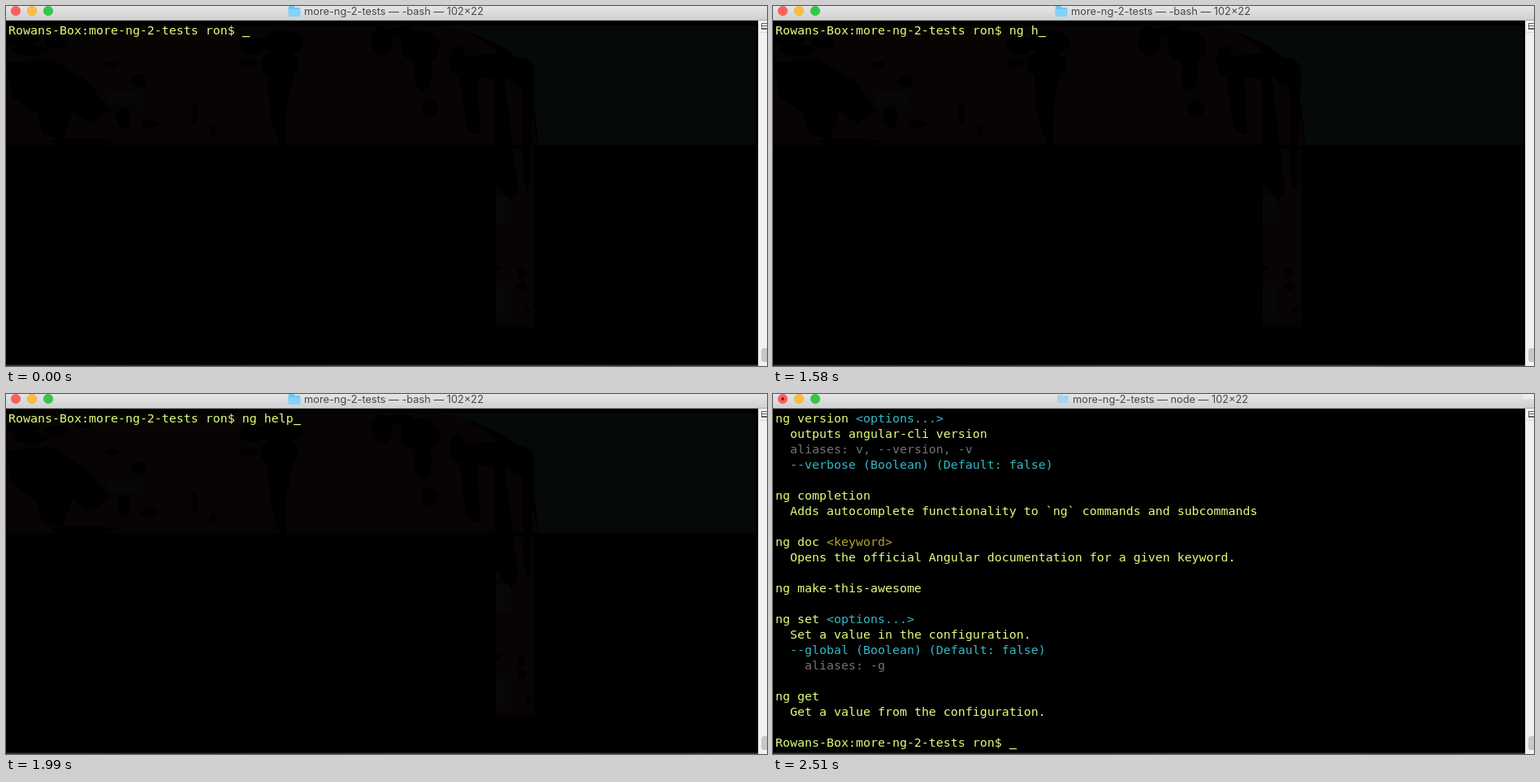
Recreate the animation shown at these times as an HTML page. Size 937x443 px, loop 2.63 s.

```html
<!DOCTYPE html>
<html lang="en">
<head>
<meta charset="utf-8">
<title>Terminal</title>
<style>
  html, body { margin: 0; width: 100%; height: 100%; overflow: hidden; background: #000; }
  svg { display: block; width: 937px; height: 443px; }
  text { white-space: pre; }
  .mono { font: 14.95px "DejaVu Sans Mono", monospace; }
  .title { font: 12.8px Inter, sans-serif; fill: #484848; }
</style>
</head>
<body>
<svg id="stage" viewBox="0 0 937 443">
  <defs>
    <linearGradient id="bar" x2="0" y2="1">
      <stop stop-color="#e5e5e5"/><stop offset="1" stop-color="#d1d1d1"/>
    </linearGradient>
    <linearGradient id="desk">
      <stop stop-color="#30383a"/><stop offset=".2" stop-color="#202a35"/>
      <stop offset=".45" stop-color="#263840"/><stop offset=".62" stop-color="#4a3024"/>
      <stop offset=".74" stop-color="#59301f"/><stop offset=".82" stop-color="#25333a"/>
      <stop offset="1" stop-color="#34393c"/>
    </linearGradient>
  </defs>
  <rect width="937" height="443"/>
  <g id="shade">
    <path fill="#080404" d="M0 24H530Q635 35 655 171H0ZM603 176H650V395H603Z"/>
    <path fill="#060909" d="M530 24H924V171H655Q650 60 600 45Q565 27 530 24Z"/>
    <g id="blobs"></g>
    <path d="M601 90Q606 78 614 90L629 215Q632 238 618 238L603 215ZM636 85Q648 72 650 92L644 225Q639 232 637 195ZM558 85L580 88L584 158Q568 158 566 143ZM322 80L354 85L345 125L344 192L325 135ZM0 70L55 65L100 92L128 128L104 145L82 130L70 164L45 158L38 132L8 112Z"/>
    <path fill="#060808" d="M125 107H167V121H125ZM603 234H618Q623 237 622 268H603ZM603 345H621V384H603Z"/>
  </g>
  <rect width="937" height="17" fill="url(#bar)"/>
  <path fill="#a9a9a9" d="M0 17H937V18H0Z"/>
  <circle cx="12" cy="6" r="5.75" fill="#fc605c" stroke="#e14942" stroke-width=".5"/>
  <circle cx="32" cy="6" r="5.75" fill="#fdbc40" stroke="#dfa023" stroke-width=".5"/>
  <circle cx="52" cy="6" r="5.75" fill="#34c84a" stroke="#25aa35" stroke-width=".5"/>
  <path fill="#f1f1f1" d="M926 18H937V443H926Z"/>
  <path fill="#d9d9d9" d="M926 18H927V443H926ZM926 32H937V33H926Z"/>
  <path fill="#606060" d="M930 21H937V22H930ZM930 24H937V25H930ZM930 27H937V29H930ZM930 21H931V29H930Z"/>
  <rect x="930" y="421" width="10" height="17" rx="3.5" fill="#c7c7c7"/>
  <rect y="441.5" width="926" height="1.5" fill="url(#desk)"/>
  <g id="shell">
    <path fill="#6ac4f4" d="M348 0H354L356 2H362V12H348Z"/>
    <path fill="#83d2fb" d="M347 4H363L362 13H348Z"/>
    <text class="title" x="367" y="11">more-ng-2-tests — -bash — 102×22</text>
  </g>
  <g id="help">
    <circle cx="12" cy="6" r="2" fill="#8c1a15"/>
    <path fill="#a7d5ec" d="M350 1H356L357 2H364V11H350Z"/>
    <text class="title" x="369" y="11">more-ng-2-tests — node — 102×22</text>
    <path fill="#ededed" d="M924 0H937V6H924Z"/>
  </g>
  <path id="marks" fill="none" stroke="#777" d="M2 25.5H.5V35.5H2M922 25.5H923.5V35.5H922"/>
</svg>
<script>
const LOOP = 2630, ENTER = 2450, OUTPUT = 2510;
const CELL = 9, LINE = 19, LEFT = 3, BASE = 35;
const LIME = '#deff7c', CYAN = '#33b9c7', GRAY = '#737373', OLIVE = '#b3a32d';
const PROMPT = 'Rowans-Box:more-ng-2-tests ron$ ';
const $ = id => document.getElementById(id);

function add(parent, tag, attrs) {
  const el = document.createElementNS('http://www.w3.org/2000/svg', tag);
  for (const key in attrs) el.setAttribute(key, attrs[key]);
  return parent.appendChild(el);
}

function write(parent, row, col, str, fill = LIME) {
  const el = add(parent, 'text', { class: 'mono', x: LEFT + col * CELL, y: BASE + row * LINE, fill });
  el.textContent = str;
  return el;
}

// Dark patches in the translucent background: x, y, rx, ry
const blobs = [
  [20, 42, 20, 6], [62, 45, 14, 7], [30, 54, 22, 7], [95, 37, 10, 5],
  [164, 92, 9, 8], [145, 137, 9, 13], [177, 146, 11, 5], [130, 72, 9, 4],
  [232, 133, 4, 13], [255, 153, 3, 6], [303, 49, 16, 11], [340, 45, 26, 15],
  [298, 71, 11, 5], [337, 72, 24, 17], [463, 43, 13, 18], [487, 32, 15, 7],
  [510, 50, 24, 20], [513, 82, 11, 23], [521, 126, 10, 11], [556, 67, 10, 18],
  [598, 74, 47, 15], [634, 82, 16, 18], [634, 328, 5, 8], [635, 345, 6, 5],
  [606, 323, 4, 3], [643, 375, 3, 3], [95, 167, 40, 4]
];
for (const [cx, cy, rx, ry] of blobs) add($('blobs'), 'ellipse', { cx, cy, rx, ry });

const typed = write($('shell'), 0, 0, PROMPT);
const cursor = add($('stage'), 'rect', { width: CELL, height: 1.2, fill: LIME });

const help = [
  [0, 0, 'ng version'], [0, 11, '<options...>', CYAN],
  [1, 2, 'outputs angular-cli version'],
  [2, 2, 'aliases: v, --version, -v', GRAY],
  [3, 2, '--verbose (Boolean) (Default: false)', CYAN],
  [5, 0, 'ng completion'],
  [6, 2, 'Adds autocomplete functionality to `ng` commands and subcommands'],
  [8, 0, 'ng doc'], [8, 7, '<keyword>', OLIVE],
  [9, 2, 'Opens the official Angular documentation for a given keyword.'],
  [11, 0, 'ng make-this-awesome'],
  [13, 0, 'ng set'], [13, 7, '<options...>', CYAN],
  [14, 2, 'Set a value in the configuration.'],
  [15, 2, '--global (Boolean) (Default: false)', CYAN],
  [16, 4, 'aliases: -g', GRAY],
  [18, 0, 'ng get'],
  [19, 2, 'Get a value from the configuration.'],
  [21, 0, PROMPT]
];
for (const line of help) write($('help'), ...line);

const COMMAND = 'ng help';
const keyTimes = [1140, 1230, 1350, 1580, 1700, 1870, 1990];

function show(el, on) {
  el.style.display = on ? '' : 'none';
}

function render(t) {
  const done = t >= OUTPUT, entered = t >= ENTER;
  const count = keyTimes.filter(k => t >= k).length;
  show($('shade'), !done);
  show($('shell'), !done);
  show($('help'), done);
  show($('marks'), entered && !done);
  typed.textContent = PROMPT + COMMAND.slice(0, count);
  const row = done ? 21 : entered ? 1 : 0;
  const col = done ? PROMPT.length : entered ? 0 : PROMPT.length + count;
  cursor.setAttribute('x', LEFT + col * CELL);
  cursor.setAttribute('y', BASE + 2 + row * LINE);
}

const start = performance.now();
function tick() {
  render((performance.now() - start) % LOOP);
  requestAnimationFrame(tick);
}
tick();
</script>
</body>
</html>
```
